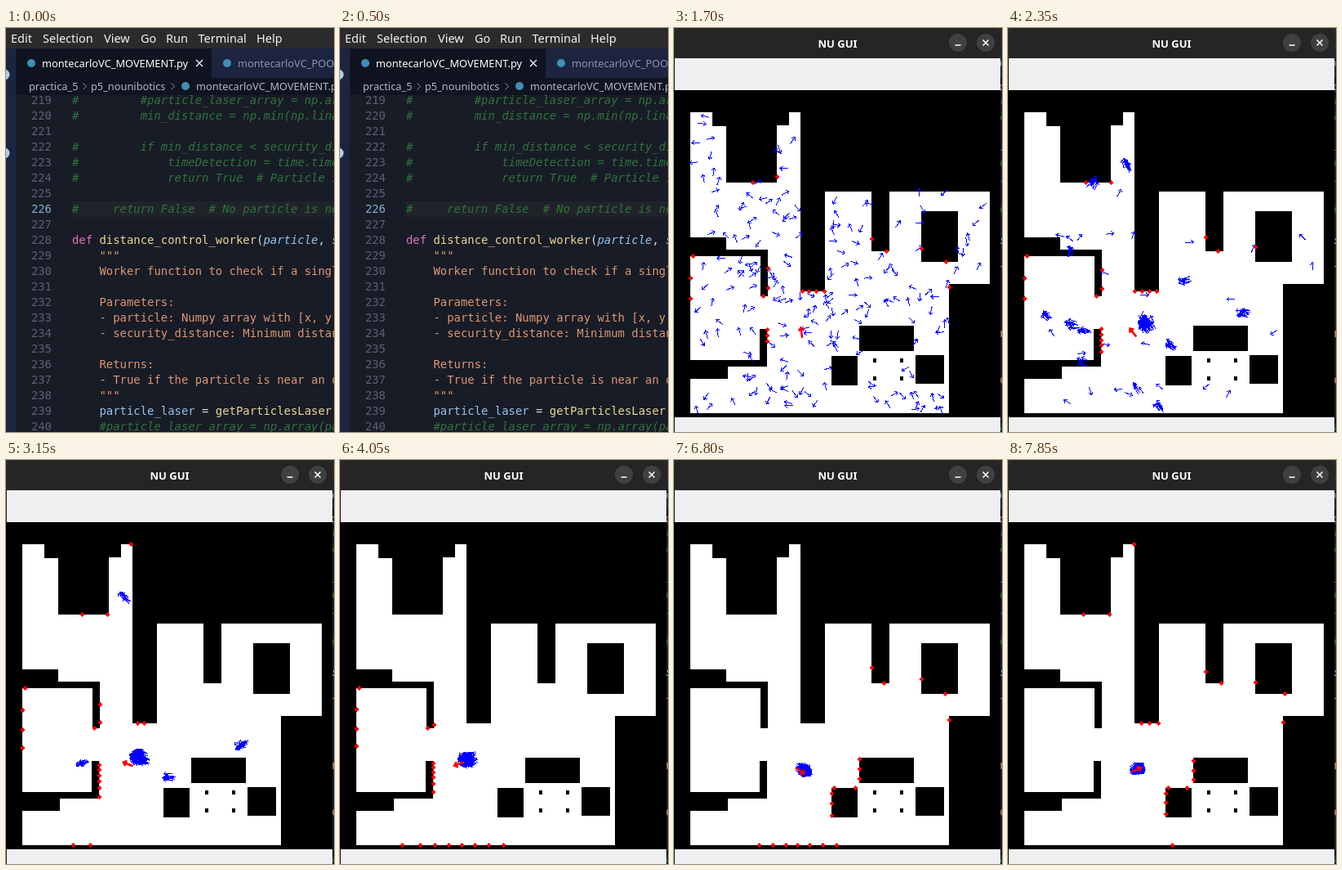
These frames come from a looping animation (402x494 px, 8000 ms). An HTML page:

```html
<!DOCTYPE html>
<html lang="en">
<head>
<meta charset="utf-8">
<title>Particle localisation</title>
<style>
  html, body { margin: 0; width: 100%; height: 100%; overflow: hidden; background: #181c26; }
  svg { display: block; width: 402px; height: 494px; }
  text { white-space: pre; }
  .ui { font-family: "Noto Sans", "Open Sans", sans-serif; font-size: 12.8px; }
  .menu { font-size: 14.5px; fill: #f2f2f2; }
  .title { font-size: 13px; font-weight: 700; fill: #fff; }
  .code { font-family: "DejaVu Sans Mono", monospace; font-size: 13.92px; }
  .rem { fill: #2f743b; font-style: italic; }
  .doc { fill: #dc9673; }
  .key { fill: #dd70bd; }
  .fn { fill: #e7d793; }
  .var { fill: #93c5ee; }
  .arg { fill: #93c5ee; font-style: italic; }
  .op { fill: #d8dbe2; }
  .crisp { shape-rendering: crispEdges; }
</style>
</head>
<body>
<svg viewBox="0 0 402 494">
  <defs><clipPath id="page"><rect x="12" y="82" width="390" height="412"/></clipPath></defs>
  <g id="editor">
    <rect width="402" height="494" fill="#181c26"/>
    <rect x="12" y="25" width="390" height="57" fill="#0f1420"/>
    <rect y="25" width="12" height="469" fill="#1c2440"/>
    <rect x="252" y="25" width="150" height="36" fill="#1c2440"/>
    <rect width="402" height="25" fill="#2b2b2d"/>
    <circle cx="-2" cy="57" r="6.5" fill="#a9cfe8"/>
    <circle cx="-2" cy="153" r="6.5" fill="#a9cfe8"/>
    <g class="ui menu">
      <text x="6" y="18">Edit</text>
      <text x="45" y="18">Selection</text>
      <text x="120" y="18">View</text>
      <text x="165" y="18">Go</text>
      <text x="196" y="18">Run</text>
      <text x="235.500" y="18">Terminal</text>
      <text x="307" y="18">Help</text>
    </g>
    <g fill="#3f8fb8">
      <circle cx="31" cy="43" r="5"/><circle cx="271" cy="43" r="5"/><circle cx="220" cy="71" r="5"/>
    </g>
    <g class="ui">
      <text x="44" y="47.500" fill="#fff">montecarloVC_MOVEMENT.py</text>
      <text x="284" y="47.500" fill="#8c94ad">montecarloVC_POOL.py</text>
      <g fill="#b3b7c2">
        <text x="28" y="76">practica_5</text>
        <text x="104" y="76">p5_nounibotics</text>
        <text x="233" y="76">montecarloVC_MOVEMENT.py</text>
      </g>
    </g>
    <path d="M233 39l8 8m0-8l-8 8" stroke="#fff" stroke-width="1.2"/>
    <path d="M94.500 67.500l4 4-4 4M202.500 67.500l4 4-4 4" fill="none" stroke="#8f949f"/>
    <rect x="81" y="212" width="321" height="19" fill="#20232a"/>
    <g id="code" class="code" clip-path="url(#page)"></g>
  </g>

  <g id="win">
    <path d="M0 494V12Q0 0 12 0H388Q400 0 400 12V494Z" fill="#252525"/>
    <rect x="1" y="37" width="399" height="457" fill="#efeef0"/>
    <text class="ui title" x="200.500" y="24" text-anchor="middle">NU GUI</text>
    <circle cx="348" cy="18" r="11" fill="#404040"/>
    <circle cx="382" cy="18" r="11" fill="#404040"/>
    <path d="M344.500 21h7M378.500 14.500l7 7m0-7l-7 7" stroke="#fff" stroke-width="1.5"/>
    <rect class="crisp" y="76" width="400" height="400"/>
    <path class="crisp" id="map" fill="#fff" fill-rule="evenodd"/>
    <path class="crisp" id="swarm" fill="none" stroke="#00f"/>
    <path class="crisp" id="hits" fill="#f00"/>
    <path id="robot" fill="none" stroke="#f00" stroke-width="2.600"/>
  </g>
</svg>
<script>
const LOOP = 8000, OPEN = 1550, BEAMS = 20, COUNT = 200, RAD = Math.PI / 180;
const $ = id => document.getElementById(id);

// Editor text
const esc = s => s.replace(/</g, '&lt;');
const span = (cls, s) => `<tspan class="${cls}">${esc(s)}</tspan>`;
const rem = s => span('rem', s), doc = s => span('doc', '    ' + s);
const LINES = [
  rem('#         #particle_laser_array = np.array('),
  rem('#         min_distance = np.min(np.linalg'),
  '',
  rem('#         if min_distance < security_dist'),
  rem('#             timeDetection = time.time()'),
  rem('#             return True  # Particle is '),
  '',
  rem('#     return False  # No particle is near'),
  '',
  span('key', 'def ') + span('fn', 'distance_control_worker') + span('op', '(') + span('arg', 'particle') + span('op', ', ') + span('arg', 'security'),
  doc('"""'),
  doc('Worker function to check if a single'),
  '',
  doc('Parameters:'),
  doc('- particle: Numpy array with [x, y, yaw'),
  doc('- security_distance: Minimum distance'),
  '',
  doc('Returns:'),
  doc('- True if the particle is near an obst'),
  doc('"""'),
  span('var', '    particle_laser') + span('op', ' = ') + span('fn', 'getParticlesLaser') + span('op', '('),
  rem('    #particle_laser_array = np.array(part')
];
$('code').innerHTML = LINES.map((line, i) => {
  const n = 219 + i, y = 93 + i * 19;
  return `<text x="56" y="${y}" text-anchor="end" fill="${n === 226 ? '#7db4cc' : '#596073'}">${n}</text>` +
    `<text x="81" y="${y}">${line}</text>`;
}).join('');

// Floor plan: outline, furniture, table legs
const box = (x, y, w, h) => `M${x} ${y}H${x + w}V${y + h}H${x}Z`;
const PLAN = [
  'M20 103H47V120H64V189H126V119H141V103H155V322H185V200H242V273H264V200H387V313H337V471' +
  'H20V429H66V414H114V368H105V406H20V279H106V328H115V271H64V256H20Z',
  box(303, 224, 45, 62), box(227, 364, 67, 31), box(193, 401, 32, 36), box(296, 400, 35, 35)
];
for (const x of [244, 277]) for (const y of [404, 426]) PLAN.push(box(x, y, 4, 5));
$('map').setAttribute('d', PLAN.join(''));

function wallsOf(path) {
  const walls = [];
  let x, y, x0, y0;
  const lineTo = (u, v) => { walls.push([x, y, u, v]); x = u; y = v; };
  for (const [, op, a, b] of path.matchAll(/([MHVZ])(\d+)? ?(\d+)?/g)) {
    if (op === 'M') { x = x0 = +a; y = y0 = +b; }
    if (op === 'H') lineTo(+a, y);
    if (op === 'V') lineTo(x, +a);
    if (op === 'Z') lineTo(x0, y0);
  }
  return walls;
}
const WALLS = PLAN.flatMap(wallsOf);
const between = (v, a, b) => v >= Math.min(a, b) && v <= Math.max(a, b);

function isFree(x, y) {
  const crossed = WALLS.filter(([x1, y1, x2, y2]) => x1 === x2 && x1 > x && (y1 > y) !== (y2 > y));
  return crossed.length % 2 === 1;
}

function cast(x, y, dx, dy) {
  let best = 1e4;
  for (const [x1, y1, x2, y2] of WALLS) {
    const upright = x1 === x2;
    const u = upright ? (x1 - x) / dx : (y1 - y) / dy;
    const ok = upright ? between(y + u * dy, y1, y2) : between(x + u * dx, x1, x2);
    if (ok && u > 0 && u < best) best = u;
  }
  return [x + best * dx, y + best * dy];
}

// Particles: scattered, then gathered in groups, then all near the robot
let seed = 20;
function rnd() {
  seed = (seed * 16807) % 2147483647;
  return seed / 2147483647;
}
const gauss = () => (rnd() + rnd() + rnd() + rnd() - 2) * 1.7;

// Group centres and headings, largest group first
const GROUPS = [
  [289, 350, 175], [200, 388, 150], [94, 370, 175], [146, 168, 110], [79, 362, 170], [104, 189, 70],
  [47, 351, 130], [186, 463, 130], [217, 308, 200], [76, 274, 80], [158, 440, 120], [92, 409, 160]
];
const STRAYS = 26;
const particles = [];
function addParticle(extra) {
  let x, y;
  do { x = 24 + rnd() * 360; y = 106 + rnd() * 362; } while (!isFree(x, y));
  const gather = 1680 + rnd() * 600;
  particles.push({ x, y, turn: rnd() * 360, gather, leave: gather, gx: gauss(), gy: gauss(), ga: gauss(), ...extra });
}
GROUPS.forEach((group, i) => {
  const size = Math.round(14 - i * 0.8), leave = 2400 + size * 50 + rnd() * 200;
  for (let n = 0; n < size; n++) addParticle({ group, leave });
});
for (let i = 0; i < STRAYS; i++) {
  const leave = 2400 + rnd() * 500;
  addParticle({ gather: leave, leave });
}
while (particles.length < COUNT) addParticle();

// time, heading, first beam angle, x, y
const POSE = [
  [1550, 90, 9, 157, 376], [2350, 130, 36, 155.3, 375], [4050, 200, 126, 149, 370.5],
  [5750, 277, 198, 149, 376.5], [7850, 384, 297, 154.3, 380]
];
function poseAt(t) {
  let i = 0;
  while (i < POSE.length - 2 && t >= POSE[i + 1][0]) i++;
  const a = POSE[i], b = POSE[i + 1];
  const k = Math.min(1, Math.max(0, (t - a[0]) / (b[0] - a[0])));
  return a.map((v, j) => v + (b[j] - v) * k);
}

function arrow(x, y, deg, back, front, head) {
  const at = (px, py, d, r) => [px + Math.cos(d * RAD) * r, py - Math.sin(d * RAD) * r];
  const str = p => p.map(v => v.toFixed(1)).join(' ');
  const tip = at(x, y, deg, front);
  return `M${str(at(x, y, deg, -back))}L${str(tip)}` +
    `M${str(at(...tip, deg + 140, head))}L${str(tip)}L${str(at(...tip, deg + 220, head))}`;
}

function place(p, t, [, heading, , rx, ry]) {
  if (t < p.gather) return arrow(p.x, p.y, p.turn + heading, 5, 5, 4);
  if (t < p.leave) {
    const [x, y, a] = p.group;
    return arrow(x + p.gx * 2.2, y + p.gy * 2.2, a + heading - 130 + p.ga * 10, 5, 5, 3.5);
  }
  const k = Math.min(1, Math.max(0, (7850 - t) / 5500)), spread = 2.3 + 1.5 * k;
  return arrow(rx + 17 * k + p.gx * spread, ry - 9 * k + p.gy * spread, heading + p.ga * 7, 0, 9, 3.5);
}

function drawScene(t) {
  const pose = poseAt(t), [, heading, first, x, y] = pose;
  $('swarm').setAttribute('d', particles.map(p => place(p, t, pose)).join(''));
  $('robot').setAttribute('d', arrow(x, y, heading, 3, 9.5, 5));
  let d = '';
  for (let i = 0; i < BEAMS; i++) {
    const a = 9 * (Math.round(first / 9) + i) * RAD;
    const [hx, hy] = cast(x, y, Math.cos(a), -Math.sin(a));
    d += `M${Math.round(hx) - 3} ${Math.round(hy)}l3-3 3 3-3 3Z`;
  }
  $('hits').setAttribute('d', d);
}

// The simulation refreshes at its own slower rate
const TICK = 122.8, PHASE = 4276;
let lastTick = -1;
function render(t) {
  const win = $('win');
  win.style.display = t < OPEN ? 'none' : '';
  if (t < OPEN) return;
  const grow = Math.min(1, (t - OPEN + 48) / 150);
  const s = grow < 1 ? 1 - 2 ** (-10 * grow) : 1;
  win.setAttribute('transform', `translate(${203 * (1 - s)} ${487 * (1 - s)}) scale(${s})`);
  win.setAttribute('opacity', s);
  const tick = Math.max(OPEN, PHASE + TICK * Math.floor((t - PHASE) / TICK));
  if (tick !== lastTick) drawScene(lastTick = tick);
}

const start = performance.now();
function loop() {
  render((performance.now() - start) % LOOP);
  requestAnimationFrame(loop);
}
loop();
</script>
</body>
</html>
```
